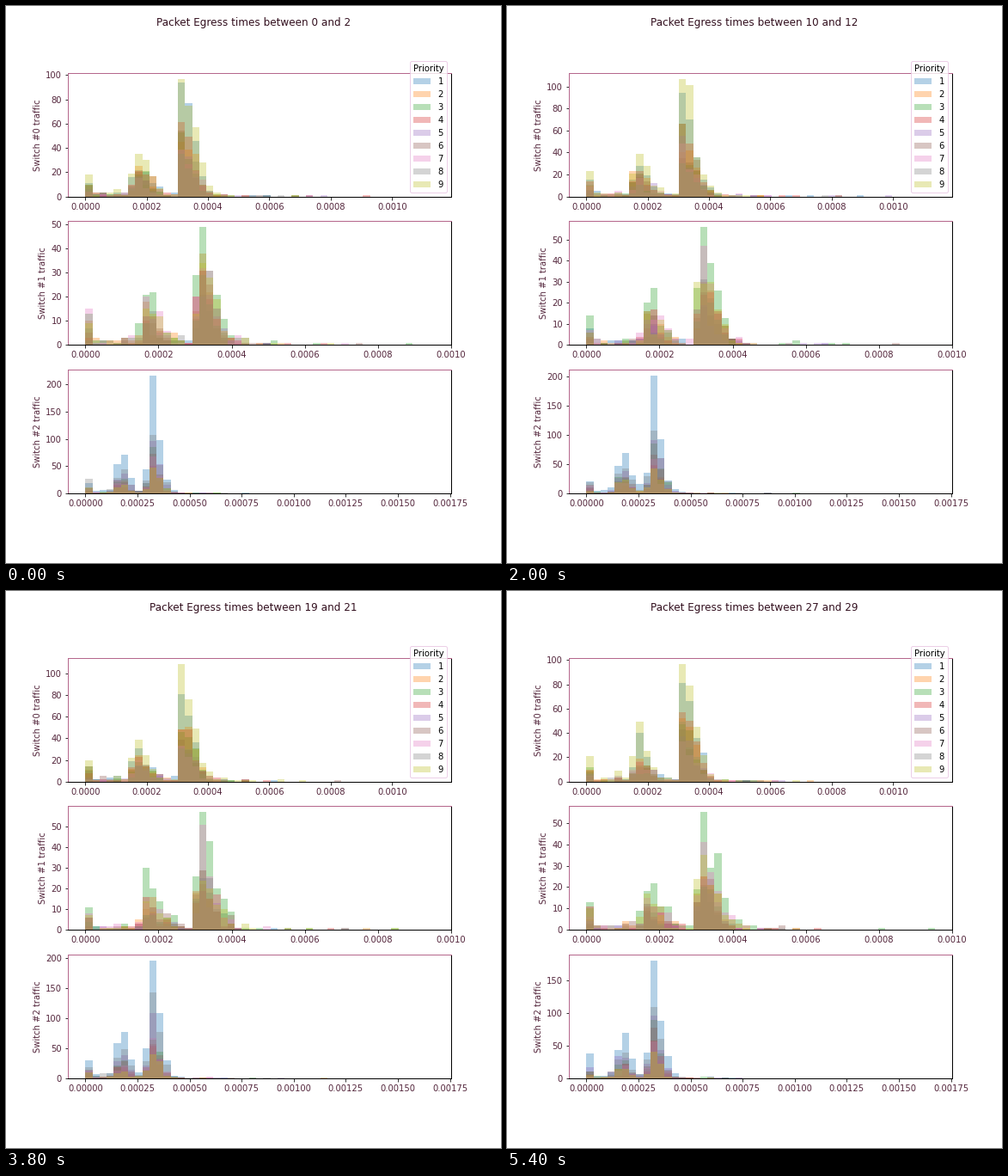
A matplotlib script that plays this animation: 576x648 px, repeating every 5.6 s.

```python
import numpy as np
import matplotlib.pyplot as plt
from matplotlib.animation import FuncAnimation
from matplotlib.patches import Patch
from matplotlib.ticker import FormatStrFormatter, MultipleLocator

FRAMES, STEP_MS, BINS, ALPHA = 28, 200, 49, 0.335
COLORS = plt.get_cmap("tab10").colors[:9]
INK, TICK_INK, ROSE = "#33101f", "#54263c", "#b5678c"

# Delay model shared by all switches, in microseconds.
# Each cluster starts abruptly and falls off as half a bell: (onset, height, width)
CLUSTERS = [(302, 1, 43), (152, 0.4, 43), (100, 0.04, 15), (20, 0.02, 300)]
INSTANT = 3.7  # packets leaving at once, as an equivalent width of the main cluster

# ranking: priorities from busiest to quietest; falloff: how fast they drop
# peaks: tallest bar at the key times
KEY_TIMES = [0, 4, 8, 12, 19, 22, 27]
SWITCHES = [
    dict(span=1137, xstep=200, xfmt="%.4f", ystep=20,
         ranking="914236578", falloff=0.48,
         peaks=[97, 116, 118, 96, 109, 102, 97]),
    dict(span=953.5, xstep=200, xfmt="%.4f", ystep=10,
         ranking="379246815", falloff=0.45,
         peaks=[49, 56, 54, 57, 57, 55, 55]),
    dict(span=1674, xstep=250, xfmt="%.5f", ystep=50,
         ranking="185367429", falloff=0.65,
         peaks=[216, 188, 176, 227, 196, 177, 181]),
]


def delay_profile(span, fine=60):
    """Mean density per bin, scaled so that the tallest bin is 1."""
    width = span / BINS
    t = (np.arange(BINS * fine) + 0.5) * width / fine
    density = sum(h * np.exp(-((t - on) / w) ** 2 / 2) * (t >= on)
                  for on, h, w in CLUSTERS)
    profile = density.reshape(BINS, fine).mean(axis=1)
    profile[0] += INSTANT / width
    return profile / profile.max()


def traffic(sw, rng):
    """Counts per window, priority and bin; each window spans two seconds."""
    profile = delay_profile(sw["span"])
    order = [int(p) - 1 for p in sw["ranking"]]
    weight = np.empty(9)
    weight[order] = np.mean(sw["peaks"]) * np.arange(1, 10) ** -sw["falloff"]

    second = rng.poisson(np.outer(weight, profile) / 2, (FRAMES + 1, 9, BINS))
    counts = second[:-1] + second[1:]
    peak = np.rint(np.interp(np.arange(FRAMES), KEY_TIMES, sw["peaks"]))
    counts = np.minimum(counts, peak[:, None, None])
    counts[:, order[0], profile.argmax()] = peak
    return counts


def setup_axes(ax, i, sw):
    span = sw["span"] * 1e-6
    ax.set_xlim(-0.05 * span, 1.05 * span)
    ax.set_xticks(np.arange(0, 1.05 * span, sw["xstep"] * 1e-6))
    ax.xaxis.set_major_formatter(FormatStrFormatter(sw["xfmt"]))
    ax.yaxis.set_major_locator(MultipleLocator(sw["ystep"]))
    ax.tick_params(labelcolor=TICK_INK)
    ax.set_ylabel(f"Switch #{i} traffic", color=TICK_INK)
    ax.spines[:].set_linewidth(1)
    ax.spines[["left", "top"]].set_color(ROSE)
    edges = np.linspace(0, span, BINS + 1)
    return [ax.stairs(np.zeros(BINS), edges, fill=True, color=c, alpha=ALPHA, lw=0)
            for c in COLORS]


rng = np.random.default_rng(12)
data = [traffic(sw, rng) for sw in SWITCHES]

fig, axes = plt.subplots(3, 1, figsize=(8, 9), dpi=72)
fig.subplots_adjust(left=0.125, right=0.9, bottom=0.125, top=0.88, hspace=0.2)
layers = [setup_axes(ax, i, sw) for i, (ax, sw) in enumerate(zip(axes, SWITCHES))]
title = fig.suptitle("", fontsize=12, y=0.98, color=INK)
axes[0].legend([Patch(color=c, alpha=ALPHA, lw=0) for c in COLORS], range(1, 10),
               title="Priority", loc="lower right", edgecolor="#e8c4e2")


def update(n):
    title.set_text(f"Packet Egress times between {n} and {n + 2}")
    for ax, steps, counts in zip(axes, layers, data):
        for step, row in zip(steps, counts[n]):
            step.set_data(values=row)
        ax.set_ylim(0, 1.05 * counts[n].max())
    return []


anim = FuncAnimation(fig, update, frames=FRAMES, interval=STEP_MS,
                     init_func=lambda: update(0), repeat=True, repeat_delay=0)
plt.show()
```
